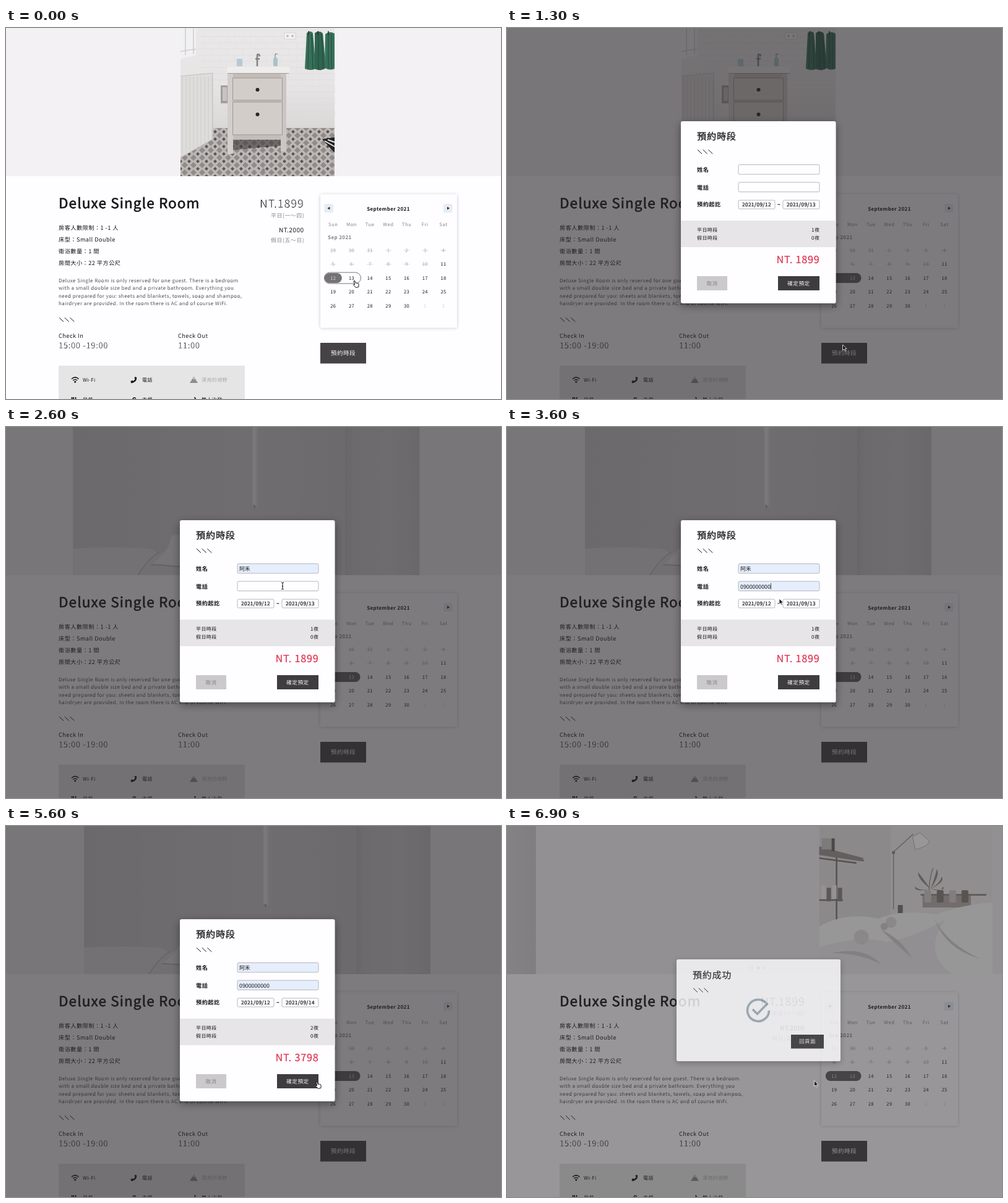
An HTML page that plays this animation: 800x601 px, repeating every 7 s.

```html
<!DOCTYPE html>
<html lang="zh-Hant">
<head>
<meta charset="utf-8">
<title>Room booking</title>
<style>
html, body { margin: 0; width: 100%; height: 100%; overflow: hidden; background: #fefdff; }
svg { display: block; width: 100vw; height: 100vh; }
text {
  font-family: "Noto Sans CJK TC", "Noto Sans CJK SC", "Noto Sans CJK JP", "Noto Sans CJK", sans-serif;
  text-rendering: geometricPrecision; white-space: pre;
}
</style>
</head>
<body>
<svg id="stage" viewBox="0 0 800 601" xmlns="http://www.w3.org/2000/svg"></svg>
<script>
const LOOP = 7000, STEP = 100;
const SLIDE = 878, REWIND_AT = 2166, NEXT_AT = 6683, SLIDE_MS = 500;
const INK = '#161517', DARK = '#454346', PAPER = '#fefdff';

// Markup helpers
const rect = (x, y, w, h, fill, more = '') =>
  `<rect x="${x}" y="${y}" width="${w}" height="${h}" fill="${fill}" ${more}/>`;
const path = (d, fill, more = '') => `<path d="${d}" fill="${fill}" ${more}/>`;
const line = (d, color, width, more = '') =>
  path(d, 'none', `stroke="${color}" stroke-width="${width}" ${more}`);
const dot = (x, y, r, fill) => `<circle cx="${x}" cy="${y}" r="${r}" fill="${fill}"/>`;
const group = (id, body, more = '') => `<g id="${id}" ${more}>${body}</g>`;

// Text centred vertically on y; heavy > 0 thickens the strokes, heavy < 0 thins them
function text(x, y, size, str, o = {}) {
  const { fill = INK, anchor = 'start', weight = 400, heavy = 0, gap = 0.05, more = '' } = o;
  const stroke = heavy
    ? `stroke="${heavy > 0 ? fill : PAPER}" stroke-width="${Math.abs(heavy) * size}"` : '';
  return `<text x="${x}" y="${y + size * 0.37}" font-size="${size}" fill="${fill}" font-weight="${weight}" ` +
    `text-anchor="${anchor}" letter-spacing="${gap * size}" ${stroke} ${more}>${str}</text>`;
}
const slashes = (x, y) =>
  line([0, 8.7, 17.4].map(d => `M${x + d} ${y - 3.3}l7 6.6`).join(''), INK, 1);

function button(x, y, w, h, label, size, fill = DARK, color = '#f4f2f5') {
  return rect(x, y, w, h, fill) +
    text(x + w / 2, y + h / 2, size, label, { fill: color, anchor: 'middle' });
}

// Photos, drawn in their own coordinates
function bathroom() {
  let s = rect(0, 0, 249, 240, 'url(#tilewall)');
  for (let r = 0; r < 18; r++) {
    s += line(`M30 ${r * 10 + 4}H249`, '#dad8d8', 0.6);
    for (let c = 0; c < 9; c++) s += line(`M${38 + c * 25 + (r % 2) * 12} ${r * 10 + 4}v10`, '#dedcdc', 0.5);
  }
  s += path('M0 0H25V44L0 50Z', '#f1f0f2') + line('M8 0V44M21 0V42M0 38L25 34', '#c6c3c4', 1.2);
  s += path('M0 206L55 162H249V240H0Z', 'url(#tiles)');
  s += path('M0 78L52 73V180L0 210Z', '#dfdcdc');
  for (let i = 0; i < 9; i++) s += line(`M${3 + i * 6} 79V${206 - i * 3.3}`, '#cdc9c9', 0.9);
  s += line('M0 78L52 73V180L0 210', '#c3bfbe', 1);
  s += rect(65, 93, 12, 29, '#a39e9e') + rect(68, 96, 7, 22, '#c9c4c4');
  s += rect(168, 8, 18, 10, '#f4f3f3', 'stroke="#c4c1c1" stroke-width=".6"') +
    dot(173, 13, 2, '#c0bdbd') + dot(181, 13, 2, '#c0bdbd');
  s += path('M76 164H170V190L82 198Z', '#3c393a', 'opacity=".6"');
  s += rect(79, 72, 90, 109, '#c3bdba') + rect(76, 72, 9, 132, '#d3cecb') + rect(162, 72, 9, 128, '#cbc6c3');
  for (const [y, h] of [[81, 36], [120, 53]])
    s += rect(84.5, y, 80, h, '#d3cdca', 'stroke="#9f9894" stroke-width="1"');
  s += dot(124.5, 100, 3, '#2b2728') + dot(124.5, 140, 3, '#2b2728');
  s += rect(75, 63, 101, 10, '#efedec', 'rx="1.5"') + line('M76 73.5H175', '#a09b99', 1.2);
  s += line('M124 62V44Q124 42 127 43L128 46M121 50H128', '#858182', 2.5);
  s += rect(91, 50, 9, 12, '#b4c9d4') + rect(150, 48, 7, 14, '#a9c3c8', 'rx="2"') +
    line('M153 48V42H157', '#777', 1);
  s += path('M204 8Q210 3 214 8L219 66Q210 70 201 66Z', '#37705a') +
    path('M217 8Q225 3 230 9L235 65Q226 71 217 66Z', '#306350') +
    path('M234 10Q241 4 249 9V66Q240 70 233 64Z', '#38715b');
  s += line('M207 10L206 65M212 10L214 66M223 10V67M228 10L231 66M239 10V65M244 10V66', '#24503f', 1.2);
  s += line('M207 5V11M222 5V11M239 5V11', '#2a2a2a', 1.5);
  s += path('M229 180L249 177V202Z', '#232122') + line('M233 183L249 192M238 181L249 185', '#e9e7e7', 2);
  return s;
}

function whiteWall() {
  return rect(0, 0, 560, 240, 'url(#wall)') + rect(440, 0, 120, 240, 'url(#corner)') +
    rect(288, 0, 12, 128, 'url(#glow)') + rect(290.5, 0, 4, 126, '#f6f5f7') +
    line('M292.5 126L294 131', '#a9a6aa', 2) +
    path('M0 197Q60 193 120 197Q134 199 136 206L105 240H0Z', '#e6e4e7') +
    path('M105 240Q124 210 140 203L283 197Q293 201 295 222L297 240Z', '#e2e0e3') +
    line('M105 240Q124 210 140 203M295 222L297 240', '#bfbcc0', 1.5) +
    path('M126 223Q156 202 158 180Q161 173 180 173Q225 172 267 170Q252 196 259 221Q230 232 190 228Q155 224 126 223Z', '#efedf0') +
    line('M126 223Q155 224 190 228Q230 232 259 221', '#bdbabe', 2);
}

function bedroom() {
  let s = rect(0, 0, 280, 240, '#eeecec') + rect(0, 0, 115, 240, '#e6e3e3');
  s += line('M28 50V158M0 44L72 56M0 52L60 60M0 120H38', '#7d7879', 2.5) + path('M0 33L72 52L66 57L0 47Z', '#989392');
  s += rect(4, 20, 16, 18, '#cbc6c5') + rect(20, 20, 5, 21, '#6d6766');
  for (let i = 0; i < 4; i++) s += rect(3 + i * 9, 96 + (i % 2) * 4, 7, 22, i % 2 ? '#8a8484' : '#f6f4f4');
  s += line('M120 135V42L152 13', '#979292', 1.3) + dot(120, 43, 2.5, '#888');
  s += path('M151 17L163 11L178 24Q176 34 155 38Z', '#fff', 'stroke="#aaa5a5" stroke-width=".8"');
  s += line('M178 112Q176 90 184 68', '#8e8f86', 1.2);
  for (const [x, y] of [[160, 75], [190, 70], [155, 98], [198, 82], [200, 98]])
    s += path(`M180 102Q${x - 2} ${y + 10} ${x} ${y}Q${x + 6} ${y + 8} 180 102Z`, '#8e8f86');
  s += rect(164, 110, 106, 3, '#958f8c') + path('M167 113H245V132H167Z', '#b5aeaa');
  for (let i = 0; i < 4; i++) s += rect(170 + i * 20, 104, 11, 20, i % 2 ? '#837f78' : '#d2cdc9', 'rx="2"');
  s += rect(127, 128, 8, 13, '#777');
  s += path('M0 163Q40 139 95 150Q130 135 190 143Q235 126 280 124V240H0Z', '#fff');
  s += path('M0 196Q70 176 110 188Q160 178 205 150Q165 205 215 240H0Z', '#f1eff0') +
    path('M100 168Q132 182 150 214Q122 190 100 168ZM186 150Q206 190 260 215Q204 200 186 150ZM20 206Q72 194 100 224Q66 206 20 206Z', '#d6d3d4');
  return s + dot(68, 180, 12, '#e4e1e1') + dot(116, 156, 9, '#e4e1e1') + dot(105, 163, 6, '#d9d5d5');
}

// Month grid; from..to is filled, ring marks the range still being picked
function calendar(from, to, ring) {
  const colX = c => 528.8 + c * 29.7, mid = { anchor: 'middle' };
  let s = rect(508, 269.5, 221, 216, PAPER, 'rx="2" filter="url(#soft)"');
  s += rect(514.5, 285, 14.5, 14, '#e6edf4', 'rx="2"') + rect(707, 285, 14.5, 14, '#e6edf4', 'rx="2"');
  s += path('M523.4 289.5V294.5L519.4 292Z', '#26313d') + path('M713 289.5V294.5L717 292Z', '#26313d');
  s += text(618, 293, 8, 'September 2021', { ...mid, weight: 700 });
  s += text(520, 339, 8, 'Sep 2021', { weight: 700, fill: '#858287' });
  'Sun Mon Tue Wed Thu Fri Sat'.split(' ').forEach((d, c) =>
    s += text(colX(c), 318, 7.6, d, { ...mid, fill: '#858287', gap: 0.08 }));
  const x0 = colX(from - 12) - 14;
  s += rect(x0, 397, colX(to - 12) + 14 - x0, 16, ring ? '#747275' : '#626063', 'rx="8"');
  if (ring) s += rect(514.3, 396, colX(ring - 12) + 15 - 514.3, 18, 'none', 'rx="9" stroke="#777578" stroke-width="1"');
  for (let i = 0; i < 35; i++) {
    const n = i - 2, day = n < 1 ? n + 31 : n > 30 ? n - 30 : n;
    const past = n < 11, x = colX(i % 7), y = 360 + Math.floor(i / 7) * 22.5;
    const fill = past ? '#a5a2a6' : n > 30 ? '#d3d0d4' : n >= from && n <= to ? '#d9d7da' : INK;
    s += text(x, y, 7.5, day, { ...mid, fill });
    if (past) s += line(`M${x - 5} ${y + 0.2}h10`, '#b3b0b4', 0.5);
  }
  return s;
}

function details() {
  const grey = { fill: '#8d8a8e' }, pale = { fill: '#aaa8ab' }, thin = { weight: 300, heavy: -0.025 };
  let s = text(85, 284, 22.5, 'Deluxe Single Room', { heavy: 0.03 });
  ['房客人數限制：1 -1 人', '床型：Small Double', '衛浴數量：1 間', '房間大小：22 平方公尺']
    .forEach((t, i) => s += text(85, 324 + i * 18.9, 9.2, t));
  ['Deluxe Single Room is only reserved for one guest. There is a bedroom',
    'with a small double size bed and a private bathroom. Everything you',
    'need prepared for you: sheets and blankets, towels, soap and shampoo,',
    'hairdryer are provided. In the room there is AC and of course WiFi.']
    .forEach((t, i) => s += text(85, 408.7 + i * 12.6, 8, t, { gap: 0.055, ...thin }));
  s += slashes(86, 472.5);
  s += text(85, 498.5, 9.2, 'Check In') + text(278, 498.5, 9.2, 'Check Out');
  s += text(85, 514, 13, '15:00 -19:00', thin) + text(278, 514, 13, '11:00', thin);
  s += text(410, 284, 17.7, 'NT.1899', thin) + text(428, 303.5, 9, '平日(一～四)', grey);
  s += text(441, 327, 10, 'NT.2000') + text(428, 343.5, 9, '假日(五～日)', grey);
  s += rect(85, 547, 301, 54, '#e6e5e6');
  s += line('M106 568.5Q111.7 563.3 117.5 568.5M108.3 571Q111.7 568 115.2 571', INK, 1.6) + dot(111.7, 573.3, 1.5, INK);
  s += path('M208.5 565L211.3 566Q211.5 574 202.5 575.5L201.3 572.3L204.2 570.8L205.5 572Q208 570.6 208.8 568.3L207.4 567.2Z', INK);
  s += path('M297 575L303.5 564.5L310 575Z', '#8f8c90') + path('M301.5 568L303.5 565.5L305.5 568L304 569.5Z', '#c9c7ca');
  s += text(124, 570.5, 8, 'Wi-Fi') + text(220, 570.5, 8, '電話') + text(316, 570.5, 8, '漂亮的視野', pale);
  s += line('M106.5 598V604M109 598V604M112.5 598V604', INK, 1.8) + line('M205 601Q206 597.5 210 600', INK, 1.6) +
    line('M305 598L307 604', INK, 1.8);
  return s + text(124, 602.5, 8, '早餐') + text(220, 602.5, 8, '衣櫃') + text(316, 602.5, 8, '雙人沙發');
}

const field = (id, x, y, w, h) =>
  rect(x, y, w, h, PAPER, `id="${id}" rx="2" stroke="#b9b7bb" stroke-width="1"`);

function bookingModal() {
  const bold = { weight: 700 }, end = { anchor: 'end' };
  return rect(281, 151, 250.5, 295, PAPER, 'rx="3" filter="url(#deep)"') +
    text(307, 175.5, 15.2, '預約時段', { heavy: 0.02 }) + slashes(308, 200.5) +
    text(307, 229.5, 9.2, '姓名', bold) + text(307, 258.3, 9.2, '電話', bold) + text(307, 286, 9.2, '預約起訖', bold) +
    field('nameBox', 374, 221.5, 131, 15.5) + field('telBox', 374, 250, 131, 15.5) +
    field('fromBox', 374, 279, 59, 14) + field('toBox', 446, 279, 59, 14) +
    text(377, 229.5, 8.8, '阿禾', { gap: 0, more: 'id="name"' }) +
    text(377, 258.3, 8.8, '0900000000', { gap: 0, more: 'id="tel"' }) +
    rect(426, 253, 0.8, 10, INK, 'id="caret"') +
    text(380, 286.3, 8.2, '2021/09/12', { heavy: 0.03 }) +
    text(452, 286.3, 8.2, '', { heavy: 0.03, more: 'id="lastDay"' }) +
    text(439.5, 286, 8.5, '~', { anchor: 'middle', heavy: 0.03 }) +
    rect(281, 312, 250.5, 43, '#e7e5e8') +
    text(307, 327.3, 8, '平日時段') + text(307, 340.3, 8, '假日時段') +
    text(505.3, 327.3, 8, '', { ...end, more: 'id="nights"' }) + text(505.3, 340.3, 8, '0夜', end) +
    text(505.6, 375, 16.2, '', { ...end, fill: '#df3450', heavy: 0.015, more: 'id="price"' }) +
    button(307, 402, 49, 23, '取消', 8.6, '#cbc9cc', '#858287') +
    button(438, 402, 67, 23, '確定預定', 8.7, '#3e3c3f');
}

function doneModal() {
  return rect(274, 216, 265, 165, PAPER, 'rx="3" filter="url(#lift)"') +
    text(300, 241, 15, '預約成功', { heavy: 0.01 }) + slashes(301, 266) +
    line('M418.5 286.5A17.5 17.5 0 1 0 423.5 299', '#9aadb7', 3.6) +
    line('M397 297L404.5 304.5L421.5 287', '#9aadb7', 3.6) +
    button(459, 338, 53, 22.5, '回頁面', 8.5, '#353336');
}

const edge = 'stroke="#fff" stroke-width=".8" stroke-linejoin="round"';
const CURSORS = {
  arrow: path('M0 0V9.2L2.2 7.2L3.7 10.5L5.2 9.8L3.7 6.7H6.6Z', '#111', edge),
  hand: path('M0 1Q1-.5 2 1L3.2 4.2Q5.5 3.6 7.6 5Q8.6 7.5 7.8 10.5L3.4 11.5Q1.4 9 -.6 7.2Q-.3 5.8 1.6 6.6Z', '#fff',
    'stroke="#111" stroke-width="1" stroke-linejoin="round"'),
  beam: line('M-2-5Q0-5 0-4Q0-5 2-5M0-4V5M-2 6Q0 6 0 5Q0 6 2 6M-1 1H1', '#111', 1)
};

const gradient = (id, vertical, stops) =>
  `<linearGradient id="${id}" x2="${vertical ? 0 : 1}" y2="${vertical ? 1 : 0}">` +
  stops.map(([at, c, o = 1]) => `<stop offset="${at}" stop-color="${c}" stop-opacity="${o}"/>`).join('') + '</linearGradient>';
const shadow = (id, dy, blur, alpha) =>
  `<filter id="${id}" x="-20%" y="-20%" width="140%" height="140%"><feDropShadow dx="0" dy="${dy}" ` +
  `stdDeviation="${blur}" flood-opacity="${alpha}"/></filter>`;

const stage = document.getElementById('stage');
stage.innerHTML = '<defs>' +
  shadow('soft', 0.5, 2.5, 0.22) + shadow('deep', 4, 7, 0.42) + shadow('lift', 3, 5, 0.3) +
  gradient('wall', false, [[0, '#d3d1d4'], [0.5, '#dddbde'], [0.78, '#d5d3d6'], [1, '#d5d3d6']]) +
  gradient('corner', false, [[0, '#cbc9cc'], [0.12, '#d6d4d7'], [0.6, '#d9d7da'], [1, '#d0ced1']]) +
  gradient('glow', false, [[0, '#fff', 0], [0.5, '#fff', 0.7], [1, '#fff', 0]]) +
  gradient('tilewall', true, [[0, '#eae8e9'], [0.4, '#e6e4e4'], [0.7, '#d9d6d6']]) +
  '<clipPath id="frame"><rect width="800" height="240"/></clipPath>' +
  '<pattern id="tiles" width="14" height="12" patternUnits="userSpaceOnUse">' +
  rect(0, 0, 14, 12, '#bdb8b5') + path('M7 1L12 6L7 11L2 6Z', '#918c8a') +
  path('M0-3L3 0L0 3L-3 0ZM14-3L17 0L14 3L11 0ZM0 9L3 12L0 15L-3 12ZM14 9L17 12L14 15L11 12Z', '#5a5655') +
  '</pattern></defs>' +
  rect(0, 0, 800, 601, PAPER) + rect(0, 0, 800, 240, '#f3f1f4') +
  `<g clip-path="url(#frame)">` + group('track',
    group('s0', whiteWall(), 'transform="translate(126 0)"') +
    group('s1', bedroom(), `transform="translate(${266 + SLIDE} 0)"`) +
    group('s2', bathroom(), `transform="translate(${282 + 2 * SLIDE} 0)"`)) + '</g>' +
  [396, 406, 416].map((x, i) => `<circle id="dot${i}" cx="${x}" cy="230" r="2.5"/>`).join('') +
  details() + group('month', '') + button(508, 510, 74, 33.5, '預約時段', 9.6) +
  rect(0, 0, 800, 601, '#282629', 'id="shade"') +
  group('booking', bookingModal()) + group('picker', '', 'transform="translate(-62 33)"') +
  line('M406 289.5A8.5 8.5 0 1 1 397.5 298', '#cfcdd0', 2, 'id="spinner" stroke-linecap="round"') +
  group('done', doneModal()) + group('cursor', '');

const el = {};
stage.querySelectorAll('[id]').forEach(n => el[n.id] = n);
const set = (id, attr, value) => el[id].setAttribute(attr, value);
const show = (id, on) => set(id, 'opacity', +on);

// Timing helpers
const clamp = v => Math.min(1, Math.max(0, v));
const ramp = (t, a, b) => clamp((t - a) / (b - a));
const mix = (a, b, k) => a + (b - a) * k;
const smooth = k => k * k * (3 - 2 * k);

// CSS "ease": cubic-bezier(.25, .1, .25, 1)
function ease(x) {
  let lo = 0, hi = 1;
  const bez = (u, a, b) => 3 * (1 - u) ** 2 * u * a + 3 * (1 - u) * u * u * b + u ** 3;
  for (let i = 0; i < 24; i++) {
    const u = (lo + hi) / 2;
    if (bez(u, 0.25, 0.25) < x) lo = u; else hi = u;
  }
  return bez(lo, 0.1, 1);
}

// time, x, y of the pointer tip
const TRAIL = [
  [0, 562, 409], [400, 562, 409], [800, 545, 516], [1000, 543, 514], [1300, 542.5, 513], [1900, 440, 230],
  [2250, 440, 230], [2600, 447, 257], [3200, 447, 257], [3600, 440, 278], [3900, 472, 287], [4050, 472, 287],
  [4400, 467, 437], [4500, 467, 437], [4800, 526, 437], [5000, 526, 437], [5500, 501, 414], [6200, 501, 414],
  [6500, 496.5, 412.5], [7000, 496.5, 412.5]
];
const SHAPES = [[0, 'hand'], [1100, 'arrow'], [1800, 'beam'], [3300, 'arrow'], [3800, 'beam'],
  [4200, 'arrow'], [4400, 'hand'], [5100, 'arrow'], [5400, 'hand'], [6300, 'arrow']];

function moveCursor(t) {
  const i = TRAIL.findIndex(k => k[0] > t), [t0, x0, y0] = TRAIL[i - 1], [t1, x1, y1] = TRAIL[i];
  const k = smooth(ramp(t, t0, t1));
  set('cursor', 'transform', `translate(${mix(x0, x1, k)} ${mix(y0, y1, k)})`);
  el.cursor.innerHTML = CURSORS[SHAPES.filter(s => s[0] <= t).pop()[1]];
}

function draw(t) {
  const back = ease(ramp(t, REWIND_AT, REWIND_AT + SLIDE_MS));
  const next = ease(ramp(t, NEXT_AT, NEXT_AT + SLIDE_MS));
  set('track', 'transform', `translate(${-SLIDE * (2 * (1 - back) + next)} 0)`);
  const active = t < REWIND_AT ? 2 : t < NEXT_AT ? 0 : 1;
  for (let i = 0; i < 3; i++) set('dot' + i, 'fill', i === active ? '#8b898d' : '#b9b7bb');

  el.month.innerHTML = t < 100 ? calendar(12, 12, 13) : calendar(12, 13);
  const shade = 0.6 * ramp(t, 900, 1200);
  show('shade', t < 6800 ? shade : mix(0.6, 0.48, ramp(t, 6800, 6900)));
  show('booking', ramp(t, 900, 1200) * (1 - ramp(t, 6200, 6500)));

  const named = t >= 2300, dialed = t >= 3100, changed = t >= 5000;
  show('name', named);
  show('tel', dialed);
  set('nameBox', 'fill', named ? '#e5eefc' : PAPER);
  set('telBox', 'fill', dialed ? '#e5eefc' : PAPER);
  show('caret', dialed && t < 3900);
  el.lastDay.textContent = changed ? '2021/09/14' : '2021/09/13';
  el.nights.textContent = changed ? '2夜' : '1夜';
  el.price.textContent = changed ? 'NT. 3798' : 'NT. 1899';

  show('picker', ramp(t, 3900, 4100) * (1 - ramp(t, 5000, 5200)));
  el.picker.innerHTML = t < 4500 ? calendar(12, 13)
    : t < 4900 ? calendar(12, 12, t < 4600 ? 12 : t < 4700 ? 13 : 14) : calendar(12, 14);

  show('spinner', t >= 6400 && t < 6900);
  set('spinner', 'transform', `rotate(${(t - 6700) * 0.48} 406 298)`);
  show('done', 0.8 * ramp(t, 6800, 6900));
  moveCursor(t);
}

let last = -1;
const start = performance.now();
function tick() {
  const t = Math.floor(((performance.now() - start) % LOOP) / STEP) * STEP;
  if (t !== last) draw(last = t);
  requestAnimationFrame(tick);
}
tick();
</script>
</body>
</html>
```
